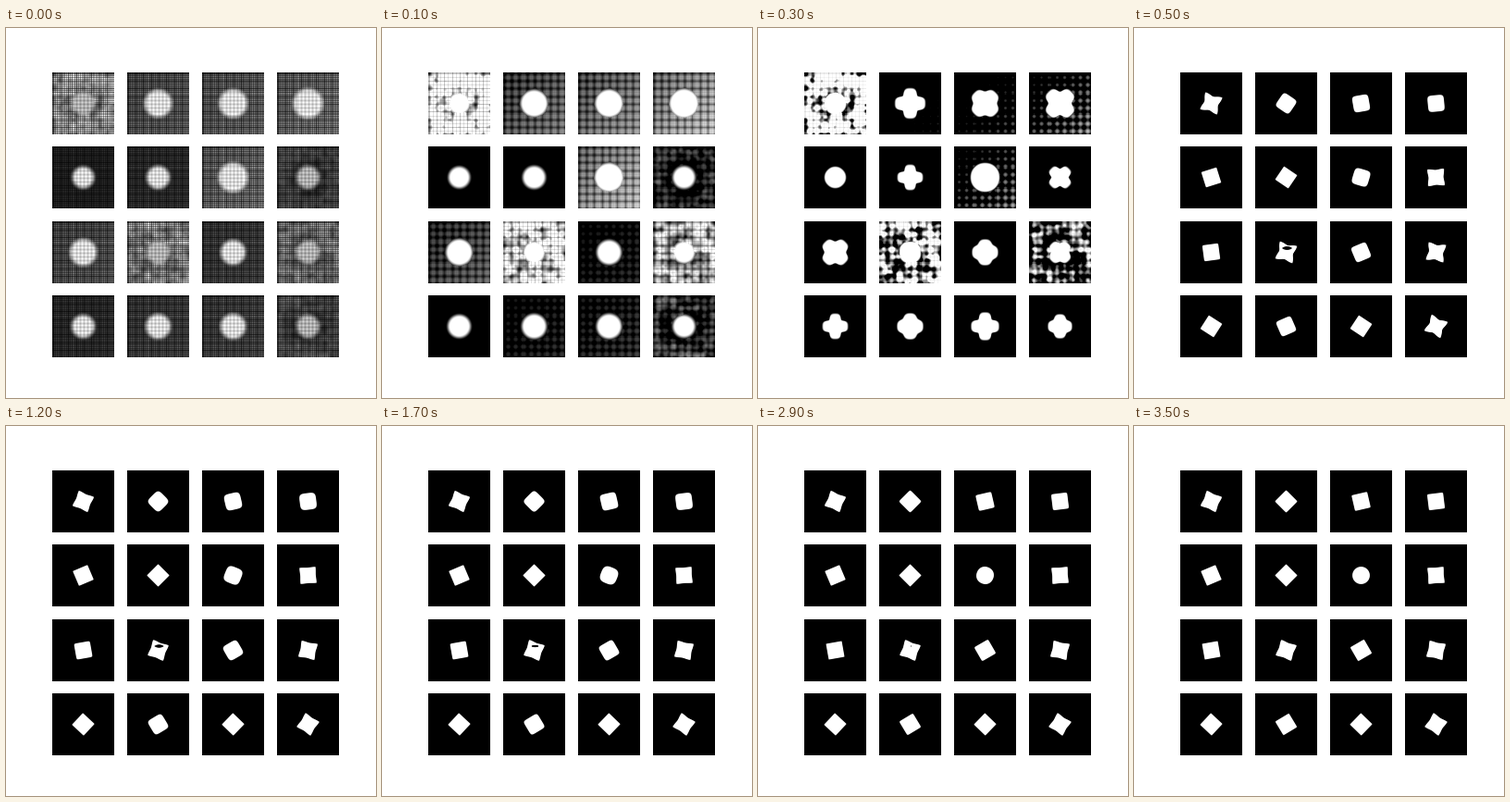
Write an HTML page with a canvas that moves like this. It is 400 px wide and 400 px high and loops after 3.6 s.

```html
<!DOCTYPE html>
<html>
<head>
<meta charset="utf-8">
<style>
html, body { margin: 0; width: 100%; height: 100%; overflow: hidden; background: #fff; }
canvas { display: block; }
</style>
</head>
<body>
<canvas id="stage" width="400" height="400"></canvas>
<script>
const ctx = document.getElementById('stage').getContext('2d');
const SIZE = 67, MID = 33, STEPS = 36, PATCHY = 9;

// grey level, final angle, corner softness (below zero: grainy, with pinched sides)
const TILES = [
  [.64, 23, -.14], [.3, 45, .46], [.34, -13, .46], [.4, -7, .48],
  [.04, -23, .1], [.1, 45, .1], [.39, 22, .55], [.23, -4, -.07],
  [.27, -10, .2], [.57, 20, -.14], [.18, -30, .4], [.47, 12, -.13],
  [.1, 43, .1], [.18, -31, .38], [.2, 44, .1], [.27, 33, -.14]
].map(([level, degrees, soft], seed) => {
  const angle = degrees * Math.PI / 180;
  return {
    level, angle, soft, seed,
    grainy: soft < 0,
    radius: soft < 0 ? 12 : 11 + 12 * level,
    // The blob first grows lobes toward the corners of its square
    lobes: -.17 * Math.cos(4 * angle),
    left: Math.round(50 + 80.9 * (seed % 4)),
    top: Math.round(48 + 80.4 * (seed >> 2))
  };
});

const clamp = v => Math.max(0, Math.min(1, v));
const mix = (a, b, k) => a + (b - a) * k;
const ramp = (a, b, v) => clamp((v - a) / (b - a));
const smooth = v => v * v * (3 - 2 * v);

function hash(x, y, seed) {
  const v = Math.sin(x * 127.1 + y * 311.7 + seed * 74.7) * 43758.5453;
  return v - Math.floor(v);
}

function noise(x, y, seed) {
  const i = Math.floor(x), j = Math.floor(y), u = smooth(x - i), v = smooth(y - j);
  return mix(mix(hash(i, j, seed), hash(i + 1, j, seed), u),
             mix(hash(i, j + 1, seed), hash(i + 1, j + 1, seed), u), v);
}

const cell = p => Math.floor((p + MID) * 64 / SIZE);
const wave = i => Math.sin((i - 2) * Math.PI / 4);

// Thin dark threads, with a fine speckle that is gone after the first step
function thread(i, s) {
  const line = i % 8 === 0 ? .3 : i % 4 === 0 ? .16 : 0;
  const speckle = s ? 1 : i % 2 ? 1.2 : .8;
  return (1 - line * ramp(4, 0, s)) * speckle;
}

function backdrop(tile, x, y, s) {
  if (s > 4) return 0;
  const { level, seed, grainy } = tile, i = cell(x), j = cell(y);
  let v = level + .09 * Math.sqrt(level) * (wave(i) + wave(j));
  if (grainy) {
    const grain = .7 * noise(i / 7, j / 7, seed) + .3 * noise(i / 3, j / 3, seed + 20);
    const ring = 1 - Math.abs(Math.hypot(x, y) - 16) / 10;
    v += level * (grain - .5) - .1 * clamp(ring);
  } else {
    v += .1 * level * (x + y) / MID;
  }
  if (s === 0) v = .08 + .68 * v;
  else v = (v - .06 - .12 * s) * (1.2 + 1.2 * s);
  return clamp(v) * thread(i, s) * thread(j, s);
}

// Superellipse: softness 1 is a circle, small values a square
function squircle(x, y, soft) {
  const p = 2 / Math.max(soft, .1);
  const pinch = 1 + Math.max(0, -soft) * Math.cos(4 * Math.atan2(y, x));
  return (Math.abs(x) ** p + Math.abs(y) ** p) ** (1 / p) * pinch;
}

// Everything that depends on the step but not on the pixel
function pose(tile, s) {
  const turn = 1 - (1 - ramp(5, 12, s)) ** 2, settle = ramp(12, 32, s);
  const { angle, soft, lobes } = tile;
  const last = soft > .5 ? 1 : soft * .3;
  return {
    angle: angle * mix(.76, 1, turn),
    soft: mix(soft * mix(.8, tile.grainy ? .3 : 1, turn), last, settle),
    lobes: lobes * ramp(1, 3, s),
    square: ramp(3, 5, s),
    blur: 1.3 + 6 * (1 - ramp(0, 5, s)) ** 2,
    gap: s < 4 ? 0 : 1 - ramp(10, 36, s)
  };
}

function shape(tile, pose, x, y) {
  const r = Math.hypot(x, y), th = Math.atan2(y, x), turned = th - pose.angle;
  const outline = 1 + pose.lobes * Math.cos(4 * th) - .3 * Math.abs(pose.lobes) * Math.cos(8 * th);
  const half = mix(8.6, 9.4, clamp(pose.soft));
  const blob = r / (tile.radius * outline);
  const box = squircle(r * Math.cos(turned), r * Math.sin(turned), pose.soft) / half;
  const inside = (1 - mix(blob, box, pose.square)) * mix(tile.radius, half, pose.square);
  let v = clamp(inside / pose.blur + .5);
  if (tile.seed === PATCHY && pose.gap) {
    const slit = Math.hypot((x - 1) / (5 * pose.gap), (y + 4.5) / (1.8 * pose.gap));
    v *= clamp((slit - 1) * 2 + .5);
  }
  return v;
}

function drawTile(tile, s) {
  const img = ctx.createImageData(SIZE, SIZE), now = pose(tile, s);
  for (let k = 0; k < SIZE * SIZE; k++) {
    const x = k % SIZE - MID, y = Math.floor(k / SIZE) - MID;
    const back = backdrop(tile, x, y, s);
    let front = smooth(shape(tile, now, x, y));
    let v = Math.max(back, front);
    if (s === 0) {
      const i = cell(x), j = cell(y);
      const glow = (tile.grainy ? .68 : .84) + .08 * (wave(2 * i) + wave(2 * j));
      v = mix(back, glow, front);
    }
    const grey = Math.round(clamp(v) * 255);
    img.data.set([grey, grey, grey, 255], k * 4);
  }
  ctx.putImageData(img, tile.left, tile.top);
}

const start = performance.now();
let shown = -1;

function frame() {
  const step = Math.floor((performance.now() - start) / 100) % STEPS;
  if (step !== shown) {
    shown = step;
    TILES.forEach(tile => drawTile(tile, step));
  }
  requestAnimationFrame(frame);
}
frame();
</script>
</body>
</html>
```
